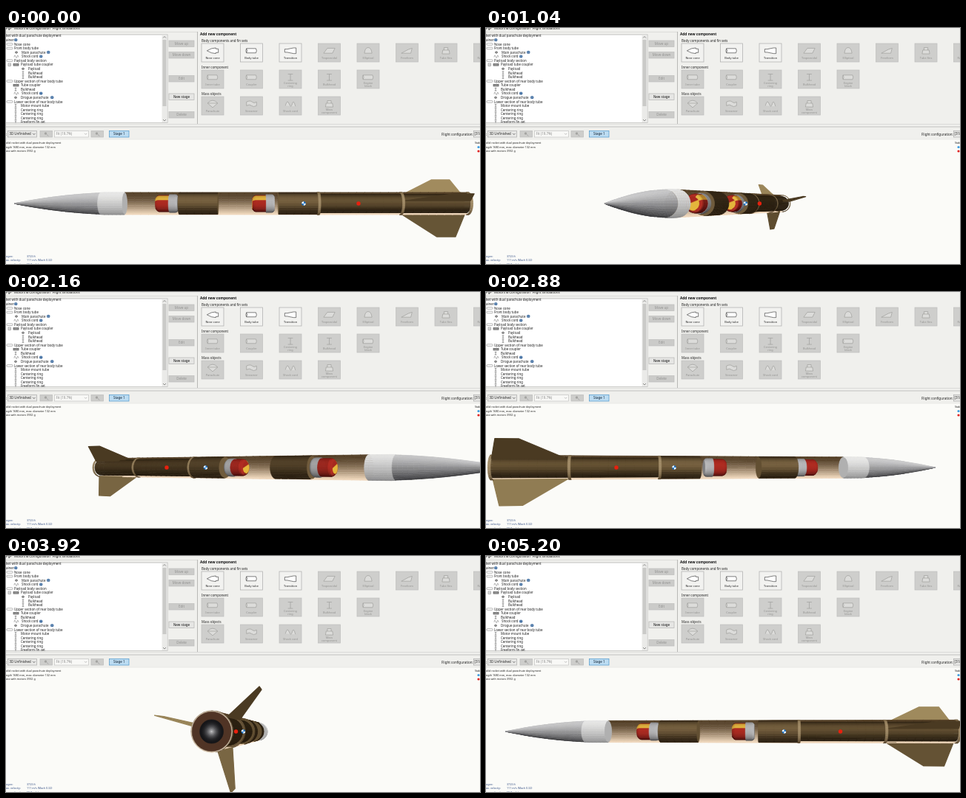
An HTML page with a canvas for the animation above (5280 ms loop, 640x320 px).

```html
<!DOCTYPE html>
<html lang="en">
<head>
<meta charset="utf-8">
<title>Rocket design viewer</title>
<style>
html, body { margin: 0; width: 100%; height: 100%; overflow: hidden; background: #fbfbf8; }
svg, canvas { position: absolute; left: 0; top: 0; width: 640px; height: 320px; }
text { font-family: "Noto Sans", "Open Sans", sans-serif; }
</style>
</head>
<body>
<svg id="ui" viewBox="0 0 640 320"></svg>
<canvas id="view" width="640" height="320"></canvas>
<script>
// ---------- static interface ----------
const ui = document.getElementById('ui');

function el(name, attrs, text) {
  const e = document.createElementNS('http://www.w3.org/2000/svg', name);
  for (const k in attrs) e.setAttribute(k, attrs[k]);
  if (text) e.textContent = text;
  ui.appendChild(e);
}
function box(x, y, w, h, fill, stroke = 'none', rx = 0) {
  el('rect', { x, y, width: w, height: h, fill, stroke, rx, 'stroke-width': 0.7 });
}
function label(x, y, text, size = 4.4, fill = '#222', anchor = 'start', weight = 400) {
  el('text', { x, y, 'font-size': size, fill, 'text-anchor': anchor, 'font-weight': weight }, text);
}
function line(d, stroke, w = 0.7, fill = 'none') {
  el('path', { d, stroke, 'stroke-width': w, fill });
}
function dot(x, y, r, fill) { el('circle', { cx: x, cy: y, r, fill }); }

function buildPanels() {
  box(0, 0, 640, 151, '#f0f0ed');
  box(0, 151, 640, 169, '#fbfbf8');
  label(0, 2.4, 'PgP');
  label(11, 2.4, 'Motors & Configuration');
  label(63, 2.4, 'Flight simulations');
  line('M0 5.5H258', '#d4d4d2');
  line('M258.5 5V130', '#b8b8b6', 1);
  line('M0 130.5H640', '#d0d0ce');
  line('M0 134H640', '#c2c2c0', 1.2);
  line('M0 151H640', '#e2e2e0');
  box(-2, 9, 220, 119.5, '#fff', '#a8a8a6');
  box(210.5, 9.5, 7, 118.5, '#eaeae8');
  box(211.5, 16, 5, 90, '#cacac8');
  line('M212 13.5l2 -2l2 2M212 124l2 2l2 -2', '#666');
}

function buildTree() {
  const rows = [
    [0, 'ket with dual parachute deployment'], [0, 'ainer', 13], [11, 'Nose cone'],
    [11, 'Front body tube'], [21, 'Main parachute', 57], [21, 'Shock cord', 47],
    [11, 'Payload body section'], [20, 'Payload tube coupler'], [30, 'Payload'],
    [30, 'Bulkhead'], [30, 'Bulkhead'], [11, 'Upper section of rear body tube'],
    [20, 'Tube coupler'], [20, 'Bulkhead'], [21, 'Shock cord', 47],
    [20, 'Drogue parachute', 62], [11, 'Lower section of rear body tube'],
    [20, 'Motor mount tube'], [20, 'Centering ring'], [20, 'Centering ring'],
    [20, 'Centering ring'], [20, 'Freeform fin set']
  ];
  rows.forEach(([x, text, mark], i) => {
    const y = 10.8 + i * 5.57, cx = x - 7;
    label(x, y + 1.6, text);
    if (mark) {
      line(`M${mark - 2} ${y + .2}a2.2 2.2 0 0 1 4.4 0z`, '#365f90', 0.4, '#5a86b4');
      box(mark - 1.6, y + .2, 3.6, 1.5, '#4a74a4');
    }
    if (x === 11) box(1, y - 1.3, 8, 2.6, '#fff', '#999', 1);
    if (x < 20) return;
    if (/coupler/.test(text)) box(cx - 3, y - 1.3, 7, 2.6, '#999', '#555');
    else if (/cord/.test(text)) line(`M${cx - 3} ${y + 1}q.5 -5 2 -1t2 0t2 1`, '#666', 0.5);
    else if (/chute|Payload/.test(text)) line(`M${cx - 2} ${y}q2 -3 4 0l-2 1.6z`, '#555', 0.5, '#999');
    else line(`M${cx - 1.3} ${y - 1.8}h2.6M${cx} ${y - 1.8}v3.6M${cx - 1.3} ${y + 1.8}h2.6`, '#555', 0.6);
  });
  box(3, 48, 3.6, 3.6, '#fff', '#888');
  line('M3.8 49.8H5.8', '#444', 0.5);
  box(0, 128.8, 218, 1.4, '#f0f0ed');
}

function buildSide() {
  [['Move up', 17], ['Move down', 32.5], ['Edit', 64.5], ['New stage', 89], ['Delete', 113.5]]
    .forEach(([text, y]) => {
      const on = text === 'New stage';
      box(220, y, 34, 8.5, on ? '#e6e6e4' : '#cbcbc9', on ? '#b4b4b2' : '#bebebc');
      label(237, y + 5.9, text, 4.5, on ? '#111' : '#939391', 'middle');
    });
}

function icon(kind, x, y, ink) {
  const fill = ink === '#444' ? '#fff' : '#dcdcda';
  const shapes = {
    nose: 'M-9 0Q-2 -4.5 5 -4.5V-3H9V3H5V4.5Q-2 4.5 -9 0z',
    tube: 'M-8 -3.5H7Q9 0 7 3.5H-8Q-10 0 -8 -3.5zM-8 -3.5Q-6 0 -8 3.5',
    cone: 'M-9 -2.5H-5L5 -4.5H9V4.5H5L-5 2.5H-9z',
    trap: 'M-9 4L-3 -4H9L5 4z',
    free: 'M-9 4L2 -2L8 -4L6 4z',
    round: 'M-6 4Q-5 -5 0 -5Q5 -5 6 4z',
    ring: 'M-4 -5H4M0 -5V5M-4 5H4',
    chute: 'M-8 -1Q0 -10 8 -1L0 6zM-8 -1H8',
    wave: 'M-8 -3Q-2 -6 1 -3T8 -3V3Q3 6 0 3T-8 3z',
    cord: 'M-8 3Q-5 -8 -2 0T3 0T8 4',
    mass: 'M-6 5L-5 -1H5L6 5zM-3 -1V-5H3V-1'
  };
  el('path', {
    d: shapes[kind], transform: `translate(${x} ${y}) scale(.85)`, fill, stroke: ink, 'stroke-width': 0.8
  });
}

function buildPalette() {
  label(262, 10.3, 'Add new component', 4.8, '#111', 'start', 700);
  const groups = [
    [21, 'Body components and fin sets', ['Nose cone:nose', 'Body tube:tube', 'Transition:cone',
      'Trapezoidal:trap', 'Elliptical:round', 'Freeform:free', 'Tube fins:mass', 'Rail button:ring']],
    [57, 'Inner component', ['Inner tube:tube', 'Coupler:tube', 'Centering ring:ring', 'Bulkhead:ring', 'Engine block:tube']],
    [93, 'Mass objects', ['Parachute:chute', 'Streamer:wave', 'Shock cord:cord', 'Mass component:mass']]
  ];
  groups.forEach(([y, title, items], g) => {
    label(264, y - 2.2, title);
    items.forEach((item, i) => {
      const [name, kind] = item.split(':'), x = 264 + i * 52.5, on = g === 0 && i < 3;
      box(x, y, 30, 25, on ? '#f2f2f0' : '#cececc', on ? '#aaa' : '#bebebc');
      icon(kind, x + 15, y + 9.8, on ? '#444' : '#9c9c9a');
      const words = name.length > 11 ? name.split(' ') : [name];
      words.forEach((w, j) => label(x + 15, y + (words.length > 1 ? 18.5 + j * 4 : 21), w, 3.9,
        on ? '#222' : '#939391', 'middle'));
    });
  });
}

function buildToolbar() {
  label(0, 145.6, ':');
  box(2.5, 139.5, 39, 8.5, '#e9e9e7', '#aaa');
  label(4.5, 145.4, '3D Unfinished');
  line('M36 142.8l1.8 1.8l1.8 -1.8', '#444');
  box(65.5, 139.5, 46, 8.5, '#f8f8f6', '#c4c4c2');
  label(67.5, 145.4, 'Fit (19.7%)', 4.5, '#888');
  line('M106 142.8l1.6 1.6l1.6 -1.6', '#aaa');
  [46, 115].forEach(x => {
    box(x, 139.5, 16.5, 8.5, '#cdcdcb', '#bbb');
    dot(x + 7.5, 143, 1.7, '#a4a4a2');
    line(`M${x + 9} 144.5l2.4 2`, '#999');
  });
  box(139.5, 139.5, 26.5, 8.5, '#bcdcf2', '#4a96cc');
  label(152.8, 145.4, 'Stage 1', 4.5, '#123', 'middle');
  label(588, 145.6, 'Flight configuration:', 4.5);
  box(631.5, 139.5, 20, 8.5, '#e9e9e7', '#aaa');
  label(632.5, 145.4, '[3181');
  label(0, 157.2, 'olid rocket with dual parachute deployment', 3.65);
  label(0, 162.8, 'ngth 1680 mm, max. diameter 132 mm', 3.65);
  label(0, 168.4, 'ass with motors 3932 g', 3.65);
  label(633, 157.2, 'Stabi', 3.65);
  dot(638, 161.5, 1.6, '#3a9be0');
  dot(638, 167, 1.6, '#e02020');
  const blue = '#3a5488';
  label(0, 310.5, 'ogee:', 3.65, blue);
  label(28, 310.5, '3723 ft', 3.65, blue);
  label(0, 316.2, 'ax. velocity:', 3.65, blue);
  label(28, 316.2, '111 m/s  (Mach 0.32)', 3.65, blue);
  label(0, 321.8, 'x. acceleration:', 3.65, blue);
  label(28, 321.8, '59.8 m/s²', 3.65, blue);
}

buildPanels();
buildTree();
buildSide();
buildPalette();
buildToolbar();

// ---------- rotating rocket ----------
const ctx = document.getElementById('view').getContext('2d');
const LOOP = 5280, STEP = 80, CX = 328, CY = 238, R = 15, TAIL = -297;
const SIDES = 32, TAU = Math.PI * 2, RAD = Math.PI / 180;

// time, heading in degrees, camera distance
const keys = [[0, 0, 690], [640, 41.6, 830], [1520, 105.8, 742], [2880, 193, 650],
  [3920, 264.8, 634], [4480, 308.5, 615], [5200, 354.5, 660], [LOOP, 360, 690]];

let co, si, dist, faces;

const clamp = v => Math.max(0, Math.min(1, v));
const mix = (a, b, t) => a.map((v, i) => v + (b[i] - v) * clamp(t));
const rgb = c => `rgb(${c.map(Math.round)})`;

function turn(s, a, r) {
  const u = r * Math.cos(a);
  return [-s * co - u * si, r * Math.sin(a), s * si - u * co];
}
const dot3 = (a, b) => a[0] * b[0] + a[1] * b[1] + a[2] * b[2];
const faceOn = (n, p) => dot3(n, [-p[0], -p[1], dist - p[2]]) > 0;
function project([x, y, z]) {
  const k = dist / (dist - z);
  return [CX + x * k, CY - y * k];
}
function addFace(pts, color, z, edge = 0.6) {
  faces.push({ pts: pts.map(project), color: rgb(color), z, edge });
}

const head = n => dot3(n, [.1, .3, .94]);
const sky = n => .5 + .5 * dot3(n, [.2, .85, .45]);
const wood = n => mix([42, 31, 17], [122, 100, 66], head(n) ** 3);
const motor = n => mix([40, 30, 16], [104, 84, 53], head(n) ** 3);
const wall = n => mix([82, 62, 38], [238, 214, 186], clamp(.5 - n[1] * .52) ** 1.4);
const band = n => mix([82, 65, 41], [164, 142, 106], head(n));
const gray = n => mix([80, 80, 82], [186, 186, 188], head(n));
const shoulder = n => mix([125, 125, 126], [232, 232, 231], sky(n));
const skin = n => mix([42, 42, 45], [204, 204, 205], sky(n) ** 1.1);
const cloth = (n, a) => a > 2 && a < 2.7
  ? mix([120, 70, 20], [232, 186, 66], head(n))
  : mix([70, 14, 12], [178, 44, 34], head(n));

// surface of revolution from s0 down to s1; inside = far wall only
function tube(s0, s1, radius, paint, inside = false, step = 11) {
  const rad = typeof radius === 'function' ? radius : () => radius;
  const n = Math.ceil((s0 - s1) / step), d = (s0 - s1) / n;
  for (let i = 0; i < n; i++) {
    const a = s0 - i * d, b = a - d, ra = rad(a), rb = rad(b), m = (a + b) / 2;
    for (let j = 0; j < SIDES; j++) {
      const p = j / SIDES * TAU, q = (j + 1) / SIDES * TAU, h = (p + q) / 2;
      const normal = turn((rb - ra) / d, h, 1), mid = turn(m, h, (ra + rb) / 2);
      if (faceOn(normal, mid) === inside) continue;
      addFace([turn(a, p, ra), turn(a, q, ra), turn(b, q, rb), turn(b, p, rb)],
        paint(normal, h), mid[2]);
    }
  }
}

function disc(s, r, dir, color, from = 0, to = TAU, lift = 0) {
  const c = turn(s, 0, 0);
  if (!faceOn(turn(dir, 0, 0), c)) return;
  const pts = [];
  for (let i = 0; i <= SIDES; i++) pts.push(turn(s, from + (to - from) * i / SIDES, r));
  addFace(pts, color, c[2] + lift);
}

function coupler(s0, s1) {
  tube(s0, s1, 14.6, wood);
  disc(s0, 14.6, 1, [112, 91, 60]);
  disc(s1, 14.6, -1, [98, 79, 50]);
}

function chute(s) {
  const soft = v => 11 - 3 * clamp((v - s + 4) / 4) ** 2;
  tube(s, s - 18, soft, cloth, false, 2);
  disc(s, 8, 1, [166, 40, 30]);
  disc(s, 8, 1, [228, 182, 60], 2.6, 6.1, .1);
  tube(s - 18, s - 29, v => 12 - 2 * clamp((s - 26 - v) / 3) ** 2, gray, false, 2);
  disc(s - 18, 12, 1, [165, 165, 166]);
  disc(s - 29, 10, -1, [126, 126, 128]);
}

function fin(deg) {
  const a = deg * RAD;
  const pts = [[-207, R], [-258, 47.5], [-284, 47.5], [-293, R]].map(([s, r]) => turn(s, a, r));
  const mid = turn(-260, a, 30);
  let n = turn(0, a + Math.PI / 2, 1);
  if (!faceOn(n, mid)) n = n.map(v => -v);
  addFace(pts, mix([74, 58, 34], [172, 150, 102], dot3(n, [.25, .75, .5])), mid[2], 1.2);
}

function marker(s, isMass) {
  const [x, y] = project(turn(s, 0, 0));
  const pie = (from, color, span = Math.PI / 2) => {
    ctx.fillStyle = color;
    ctx.beginPath();
    ctx.moveTo(x, y);
    ctx.arc(x, y, 2.7, from, from + span);
    ctx.fill();
  };
  if (!isMass) return pie(0, '#e8200e', TAU);
  pie(0, '#2477c8', TAU);
  pie(0, '#f4f8fc');
  pie(Math.PI, '#f4f8fc');
}

function pose(t) {
  const i = keys.findIndex(k => k[0] > t), a = keys[i - 1], b = keys[i];
  const f = (t - a[0]) / (b[0] - a[0]), angle = (a[1] + (b[1] - a[1]) * f) * RAD;
  co = Math.cos(angle);
  si = Math.sin(angle);
  dist = a[2] + (b[2] - a[2]) * f;
}

function draw(t) {
  pose(t);
  faces = [];
  const ogive = s => R * (1 - ((s - 170) / 147) ** 2);
  tube(317, 200, ogive, skin, false, 6);
  tube(200, 168, s => Math.min(R, ogive(s) + .4), shoulder, false, 6);
  disc(168, R, -1, [176, 176, 176]);
  tube(168, TAIL, R, wall, true);
  [-92, -203, TAIL + 4].forEach(s => tube(s, s - 3, R + .2, band));
  chute(125);
  coupler(94, 42);
  chute(-5);
  coupler(-40, -92);
  tube(-95, TAIL + 3, 12.4, motor);
  disc(-204, R - .3, -1, [104, 84, 56]);
  disc(TAIL, R, -1, [206, 192, 170]);
  disc(TAIL, R - .7, -1, [80, 52, 37], 0, TAU, .1);
  for (let i = 0; i < 9; i++) {
    const v = 22 + i * i * 2.6;
    disc(TAIL, 8.6 - i, -1, [v, v, v + 3], 0, TAU, .2 + i * .1);
  }
  [45, 165, 285].forEach(fin);

  faces.sort((a, b) => a.z - b.z);
  ctx.clearRect(0, 0, 640, 320);
  ctx.save();
  ctx.beginPath();
  ctx.rect(0, 152, 640, 168);
  ctx.clip();
  ctx.lineJoin = 'round';
  for (const f of faces) {
    ctx.fillStyle = ctx.strokeStyle = f.color;
    ctx.lineWidth = f.edge;
    ctx.beginPath();
    f.pts.forEach(p => ctx.lineTo(p[0], p[1]));
    ctx.closePath();
    ctx.fill();
    ctx.stroke();
  }
  marker(-74, true);
  marker(-148, false);
  ctx.restore();
}

const start = performance.now();
let last = -1;
function tick() {
  const t = Math.floor((performance.now() - start) % LOOP / STEP) * STEP;
  if (t !== last) draw(last = t);
  requestAnimationFrame(tick);
}
tick();
</script>
</body>
</html>
```
